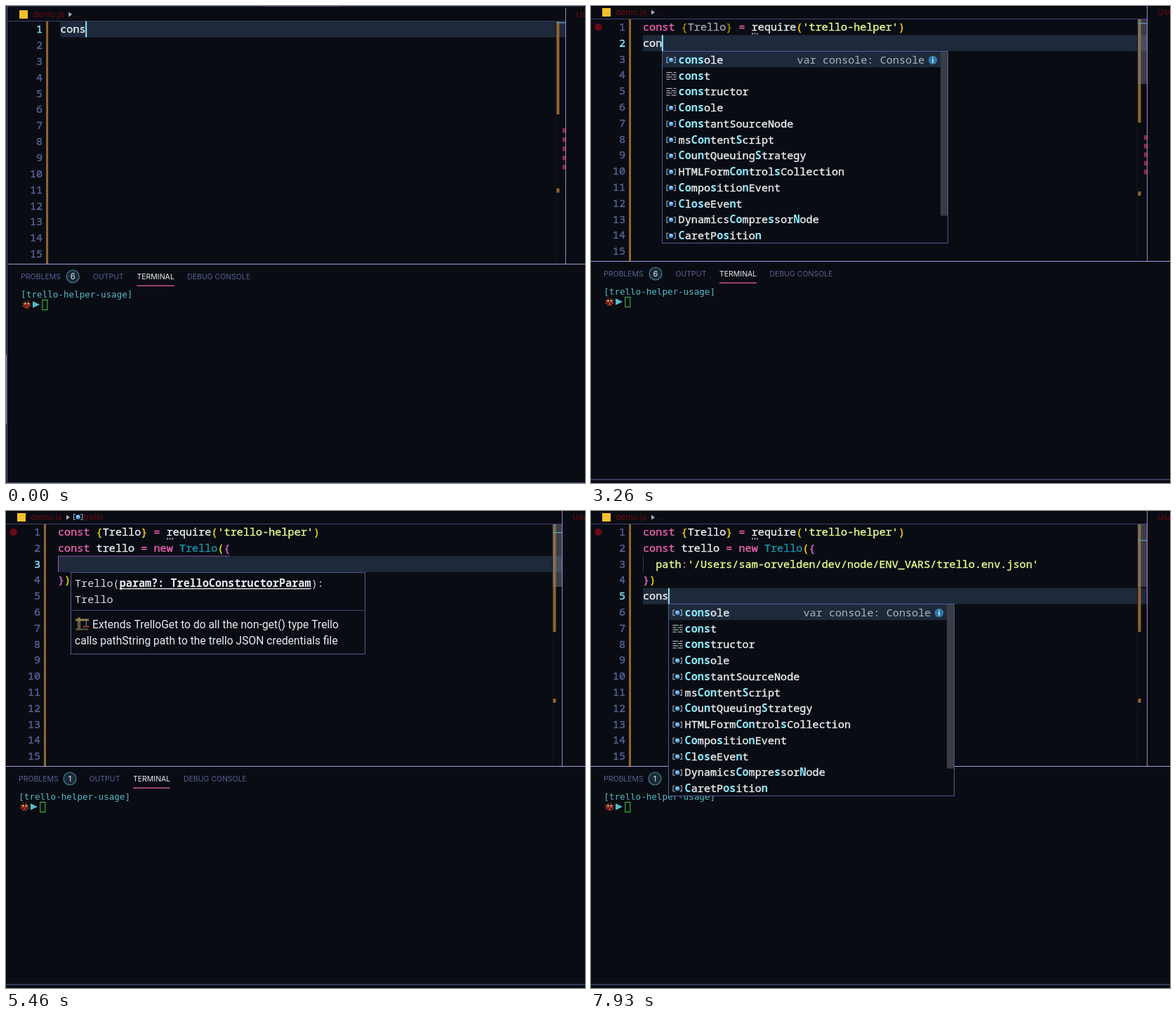
Recreate the animation shown at these times as an HTML page with a canvas. Size 825 by 679 pixels, loop 8 s.

```html
<!DOCTYPE html>
<html lang="en">
<head>
<meta charset="utf-8">
<title>Editor typing demo</title>
<style>
html, body { margin: 0; width: 100%; height: 100%; overflow: hidden; background: #090c13; }
canvas { display: block; }
</style>
</head>
<body>
<canvas id="stage" width="825" height="679"></canvas>
<script>
const ctx = document.getElementById('stage').getContext('2d');
const LOOP = 8000, CW = 9.1, LH = 22.8, LEFT = 74, TOP = 18.6;
const MONO = '"Noto Sans Mono", "DejaVu Sans Mono", monospace';
const CODE = '500 15.17px ' + MONO, BOLD = '700 15.17px ' + MONO, PLAIN = '400 15.17px ' + MONO;
const TERM = '12.55px "DejaVu Sans Mono", monospace';
const UI = 'Inter, "Liberation Sans", sans-serif';
const DOC = '15.65px Roboto, "Liberation Sans", sans-serif';
const C = {
  bg: '#090c13', line: '#1e2a3b', white: '#e9edf0', pink: '#ec62b2', str: '#e7f98e',
  gold: '#f5d20a', orchid: '#d468d0', cls: '#1b93ab', num: '#576293', cyan: '#8be9fd',
  term: '#57bac8', red: '#6a0914', border: '#4d5c94', bar: '#92662f'
};

const LINES = [
  "const {Trello} = require('trello-helper')",
  'const trello = new Trello({',
  "  path:'/Users/sam-orvelden/dev/node/ENV_VARS/trello.env.json'",
  '})',
  'cons'
];

// Asterisks enclose the matched letters; "=" marks keywords.
const LISTS = {
  cons: ['*cons*ole', '=*cons*t', '=*cons*tructor', '*Cons*ole', '*Cons*tantSourceNode',
    'ms*Con*tent*S*cript', '*Co*u*n*tQueuing*S*trategy', 'HTMLForm*Con*trol*s*Collection',
    '*Co*mpo*s*itio*n*Event', '*C*l*os*eEve*n*t', 'Dynamics*Co*mpre*s*sor*N*ode', '*C*aretP*os*itio*n*'],
  req: ['*req*uire', '*req*uestAnimationFrame', '*req*uestIdleCallback', '*Req*uest', 'Payment*Req*uest',
    'XMLHttp*Req*uest', 'IDB*Req*uest', 'IDBOpenDB*Req*uest', 'Payment*Req*uestUpdateEvent',
    'XMLHttp*Req*uestUpload', 'XMLHttp*Req*uestEventTarget', 'Sha*re*d*Q*ueue'],
  mod: ['*trello-help*er'],
  name: ['*Trello*'],
  new: ['=*new*', '*New*Statement'],
  cls: ['*Trell*o', '*trell*o']
};

// time, row, typed columns, popup list, popup column
const STEPS = [
  [0, 0, 4], [200, 0, 5], [330, 0, 6], [600, 0, 7], [730, 0, 12, 'name'], [860, 0, 17],
  [1000, 0, 19], [1200, 0, 20, 'req'], [1330, 0, 22, 'req', 20], [1460, 0, 24], [1600, 0, 25],
  [1730, 0, 37, 'mod'], [1930, 0, 39, 'mod'], [2060, 0, 40], [2530, 1, 0], [3130, 1, 2],
  [3260, 1, 3, 'cons'], [3400, 1, 7], [3530, 1, 12, 'name'], [3660, 1, 14], [3800, 1, 15],
  [4000, 1, 16], [4130, 1, 18, 'new'], [4260, 1, 22], [4400, 1, 24, 'cls'], [4600, 1, 25],
  [4730, 1, 26], [4860, 1, 27], [5000, 2, 2], [7060, 2, 62], [7130, 3, 2], [7260, 4, 0],
  [7660, 4, 1], [7800, 4, 3], [7930, 4, 4, 'cons']
];

function rect(x, y, w, h, fill) {
  ctx.fillStyle = fill;
  ctx.fillRect(x, y, w, h);
}
function box(x, y, w, h, stroke) {
  ctx.strokeStyle = stroke;
  ctx.lineWidth = 1;
  ctx.strokeRect(x, y, w, h);
}
function dot(x, y, r, fill) {
  ctx.fillStyle = fill;
  ctx.beginPath();
  ctx.arc(x, y, r, 0, 7);
  ctx.fill();
}
function tri(x, y, w, h, fill) {
  ctx.fillStyle = fill;
  ctx.beginPath();
  ctx.moveTo(x, y - h / 2);
  ctx.lineTo(x + w, y);
  ctx.lineTo(x, y + h / 2);
  ctx.fill();
}
function text(s, x, y, fill, font = CODE, align = 'left') {
  ctx.font = font;
  ctx.fillStyle = fill;
  ctx.textAlign = align;
  ctx.fillText(s, x, y);
  if (font === CODE) { // a hairline gives the medium weight
    ctx.strokeStyle = fill;
    ctx.lineWidth = 0.4;
    ctx.strokeText(s, x, y);
  }
}
const rowTop = r => TOP + r * LH;
const colX = c => LEFT + c * CW;

function stateAt(t) {
  const [, row, n, pop, popCol = n] = STEPS.filter(s => s[0] <= t).pop();
  const s = { t, row, n, pop, popCol };
  const f = Math.floor((t + 8) * 0.015);
  if (row === 2 && n === 2 && f > 82) {
    s.n = f <= 92 ? 2 + Math.round(30 * Math.max(0, f - 83) / 9)
                  : 32 + Math.min(29, Math.round(29 * (f - 92) / 11));
  }
  s.tip = t >= 4730 && t < 7200;
  s.tipCol = s.n - (s.n > 2 && s.n < 62 && row === 2 ? 0.2 : 0);
  s.late = t >= 5130;
  s.dim = t >= 2200 && !s.late;
  s.caret = !(row === 2 && (s.n === 2 && t >= 5330 || s.n === 62)) && !(t >= 7400 && t < 7660);
  s.shift = t < 200 ? 1 : t < 330 ? 0.66 : t < 400 ? 0.33 : 0;
  return s;
}

// Brackets and quotes still open in a piece of text
function openers(str) {
  const open = [];
  [...str].forEach((ch, i) => {
    const top = open[open.length - 1];
    if (top && top.close === ch) open.pop();
    else if ("({'".includes(ch)) open.push({ col: i, close: { '(': ')', '{': '}', "'": "'" }[ch] });
  });
  return open;
}

let depth = 0;
function codeLine(str, row, dim) {
  const y = rowTop(row) + 16.4;
  let prev = '';
  for (const m of str.matchAll(/'[^']*'?|\w+|[^\w\s]/g)) {
    const w = m[0];
    let fill = C.white;
    if (/^(const|new|=|:)$/.test(w)) fill = C.pink;
    else if (w[0] === "'" || w === 'path') fill = C.str;
    else if (w === 'Trello' && prev === 'new') fill = C.cls;
    else if ('({'.includes(w)) fill = depth++ ? C.orchid : C.gold;
    else if (')}'.includes(w)) fill = --depth ? C.orchid : C.gold;
    ctx.globalAlpha = dim && row === 0 && m.index > 5 && m.index < 14 ? 0.6 : 1;
    text(w, colX(m.index), y, fill);
    ctx.globalAlpha = 1;
    prev = w;
  }
}

function symbol(x, y, keyword) {
  if (keyword) {
    for (let i = 0; i < 4; i++) {
      rect(x, y - 5.5 + i * 3.2, i % 2 ? 5 : 8, 1.2, '#b0b5bd');
      rect(x + (i % 2 ? 7 : 10), y - 5.5 + i * 3.2, i % 2 ? 7 : 4, 1.2, '#b0b5bd');
    }
    return;
  }
  for (const [a, d] of [[x + 0.5, 2.5], [x + 12.8, -2.5]]) {
    ctx.strokeStyle = '#a9aeb6';
    ctx.lineWidth = 1.1;
    ctx.beginPath();
    ctx.moveTo(a + d, y - 3.8);
    ctx.lineTo(a, y - 3.8);
    ctx.lineTo(a, y + 3.8);
    ctx.lineTo(a + d, y + 3.8);
    ctx.stroke();
  }
  dot(x + 6.6, y, 3.3, '#4b9fe4');
  tri(x + 5.2, y - 1, 4, 2.6, '#cfe6fa');
}

function breadcrumb(s) {
  const font = '12px ' + UI;
  rect(16, 3, 12, 12, '#f8c02c');
  text('demo.js', 35, 13.3, C.red, font);
  tri(86, 9, 5, 7, '#a9adb5');
  if (s.late && s.t < 7260) {
    symbol(96, 8.5);
    text('trello', 110.5, 13.3, C.red, font);
  } else text('...', 95, 13.3, C.red, font);
  text('Users', 807, 13.3, C.red, font);
  rect(0, 18, 792, 1, '#443f70');
}

function ruler(s) {
  const early = s.t < 330;
  rect(778, 19, 1, 344, '#11151d');
  rect(779.5, 19, 4, early ? 132 : s.late ? 153 : 147, C.bar);
  rect(779.5, s.late ? 267 : early ? 256 : 264, 4, 6, C.bar);
  if (!s.late) {
    for (let i = 0; i < 5; i++) rect(788, (early ? 170.5 : 184) + i * (early ? 13 : 12.2), 4, 6.5, '#8f2a45');
  }
  if (!early) rect(779, 19, 13, s.late ? 89 : 92, 'rgba(120,125,132,.45)');
  const mark = s.row === 0 ? 20 : s.row === 1 ? 24 : s.row < 4 ? 30 : 41;
  rect(779, mark, 13, 1.5, '#5e8f9c');
  rect(792, 0, 1, 363, '#a582de');
}

function editor(s) {
  const { row, n } = s;
  const before = LINES[row].slice(0, n), open = openers(before);
  const after = row < 3 ? open.map(o => o.close).reverse().join('') : '';
  const lines = LINES.slice(0, row).concat(before + after);
  if (row === 2) lines.push(LINES[3]);

  rect(LEFT, rowTop(row), 718, LH, C.line);
  if (s.t >= 330) dot(10.5, 30, 5.3, '#690a14');
  for (let i = 0; i < 15; i++) {
    text(i + 1, 49, rowTop(i) + 16.4, i === row ? C.cyan : C.num, CODE, 'right');
  }
  rect(54, 19, 3, 344, C.bar);

  if (row >= 2) {
    rect(74, rowTop(2), 1, LH, row < 4 ? '#9a55a8' : '#343b49');
    if (row === 2) rect(74, rowTop(2) - 0.6, 245, 1, '#8c4c9a');
  }
  depth = 0;
  lines.forEach((l, i) => codeLine(l, i, s.dim));
  if (s.t >= 2200) for (let i = 0; i < 3; i++) rect(229 + i * 3.6, 38.5, 2, 2, '#a9adb5');

  const top = open[open.length - 1];
  if (top && top.close !== "'") {
    for (const c of [top.col, n]) box(Math.round(colX(c)) + 0.5, rowTop(row) + 0.9, 8.5, 21, '#77794b');
  }
  if (s.caret) rect(colX(n) - 0.5, rowTop(row), 2, LH, C.cyan);
}

function ladybug(x, y) {
  ctx.strokeStyle = '#6b3a2c';
  ctx.lineWidth = 1.4;
  ctx.beginPath();
  for (let a = 0.4; a < 6.3; a += 0.785) {
    ctx.moveTo(x, y);
    ctx.lineTo(x + 7 * Math.cos(a), y + 6.5 * Math.sin(a));
  }
  ctx.stroke();
  dot(x, y + 0.5, 5, '#a62b20');
  dot(x, y - 2.5, 2.8, '#2a1916');
  for (const d of [-2, 2]) {
    dot(x + d, y - 1.5, 1.2, '#f0c877');
    dot(x + d * 1.2, y + 2.5, 1.1, '#2a1114');
  }
}

function panel(s) {
  const o = s.late ? 2 : 0, font = '10.5px ' + UI, y = 385;
  rect(0, 363, 825, 1, '#a99cdc');
  rect(0, 673.5, 825, 1.2, '#4c5795');
  text('PROBLEMS', 18, y, C.num, font);
  dot(92 - o / 2, 381, 9, '#1c2a38');
  ctx.strokeStyle = '#468c9c';
  ctx.lineWidth = 1.1;
  ctx.stroke();
  text(s.late ? '1' : '6', 92 - o / 2, 385.2, C.white, '11px ' + UI, 'center');
  text('OUTPUT', 120.5 - o, y, C.num, font);
  text('TERMINAL', 183 - o, y, C.white, font);
  rect(183 - o, 393.5, 53, 1.5, '#c9518f');
  text('DEBUG CONSOLE', 254.5 - o * 0.8, y, C.num, font);
  text('[trello-helper-usage]', 18.3, 410.5, C.term, TERM);
  ladybug(26.5, 421);
  tri(35, 421, 10, 9.5, C.term);
  box(48.8, 414.5, 7, 14, '#3fc84a');
}

function crane(x, y) {
  rect(x + 3, y, 4, 18, '#7d7345');
  rect(x, y + 2, 19, 3, '#8d8152');
  rect(x + 4.3, y + 6, 1.4, 10, '#3a3a34');
  rect(x + 15, y + 5, 1, 7, '#8a8f96');
  rect(x + 11, y + 12, 8, 2, '#9c3a3c');
  rect(x, y + 16, 18, 2, '#5e5a45');
}

function tooltip(s) {
  const x = Math.round(colX(s.tipCol)), y = Math.round(rowTop(s.row + 1)) + 0.5, w = 419, h = 116;
  rect(x, y, w, h, C.bg);
  box(x + 0.5, y, w, h, C.border);
  rect(x, y + 53.5, w, 1, '#38456f');
  const sig = 'param?: TrelloConstructorParam', px = x + 6 + 7 * CW, grey = '#d6dae0';
  text('Trello(', x + 6, y + 20.5, grey, PLAIN);
  text(sig, px, y + 20.5, C.white, BOLD);
  rect(px, y + 22.5, sig.length * CW, 1.3, C.white);
  text('):', px + sig.length * CW, y + 20.5, grey, PLAIN);
  text('Trello', x + 6, y + 43.3, grey, PLAIN);
  crane(x + 7, y + 64);
  text('Extends TrelloGet to do all the non-get() type Trello', x + 31, y + 79.5, C.white, DOC);
  text('calls pathString path to the trello JSON credentials file', x + 6, y + 102, C.white, DOC);
}

function popup(s) {
  const list = LISTS[s.pop], x = Math.round(colX(s.popCol)), y = Math.floor(rowTop(s.row + 1)) + 0.5;
  const rowH = 22.75, h = list.length * rowH, w = 407;
  rect(x, y, w, h, C.bg);
  rect(x, y, w, rowH, C.line);
  list.forEach((item, i) => {
    const cy = y + 12.3 + i * rowH;
    symbol(x + 6.5, cy, item[0] === '=');
    let lx = x + 23.6;
    item.replace('=', '').split('*').forEach((part, k) => {
      text(part, lx, cy + 5, k % 2 ? C.cyan : C.white, k % 2 ? BOLD : CODE);
      lx += part.length * CW;
    });
  });
  if (s.pop === 'cons') {
    text('var console: Console', x + 192.5, y + 17.3, '#aeb4bc', PLAIN);
    dot(x + 386, y + 12.5, 6.3, '#2c78a8');
    text('i', x + 386, y + 16.5, '#d5e8f4', '700 11px ' + UI, 'center');
  }
  if (list.length > 2) rect(x + 397, y, 10, 234, '#393d44');
  box(x + 0.5, y, w, h, C.border);
}

function draw(t) {
  const s = stateAt(t), k = s.shift;
  ctx.setTransform(1, 0, 0, 1, 0, 0);
  rect(0, 0, 825, 679, C.bg);
  if (k) {
    rect(0, 0, 825, 1, '#1f2d45');
    rect(365, 0, 113, 1, '#4b3a72');
    rect(1, 0, 1, 679, '#515d90');
    rect(0, 496, 1, 99, '#777b86');
  } else rect(0, 0, 825, 1, '#05070c');
  ctx.setTransform(1 + 0.0025 * k, 0, 0, 1 + 0.0025 * k, 3 * k, 3 * k);
  breadcrumb(s);
  editor(s);
  ruler(s);
  panel(s);
  if (s.tip) tooltip(s);
  if (s.pop) popup(s);
}

const start = performance.now();
function tick() {
  draw((performance.now() - start) % LOOP);
  requestAnimationFrame(tick);
}
tick();
</script>
</body>
</html>
```
